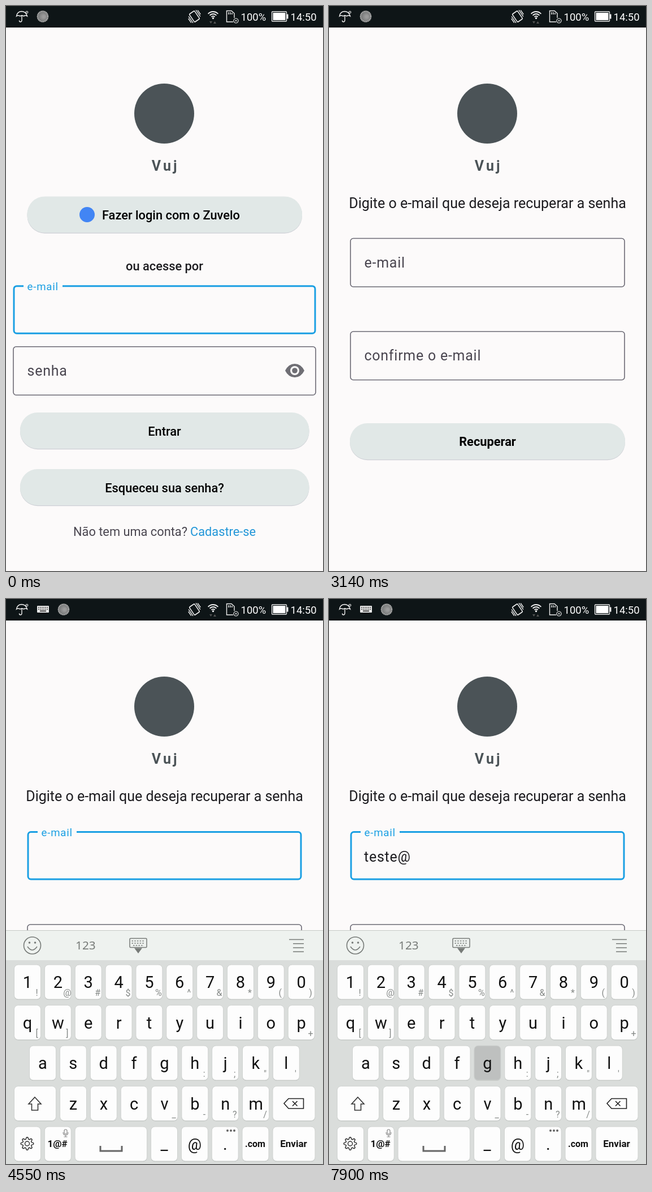
Recreate the animation shown at these times as an HTML page with a canvas. Size 561 px wide and 998 px high, loop 8000 ms.

```html
<!DOCTYPE html>
<html lang="pt">
<head>
<meta charset="utf-8">
<style>
html, body { margin: 0; width: 100%; height: 100%; overflow: hidden; background: #fcfafa; }
canvas { display: block; }
</style>
</head>
<body>
<canvas id="stage" width="561" height="998"></canvas>
<script>
const ctx = document.getElementById('stage').getContext('2d');
const LOOP = 8000, BLUE = '#1a9fe3', INK = '#49454f', PAPER = '#fcfafa', BUTTON = '#e1e8e7';
const BODY = 24.93, SMALL = 18.7, LABEL = 21.8, SPACING = 0.78;

const clamp = v => Math.min(1, Math.max(0, v));
const progress = (t, start, end) => clamp((t - start) / (end - start));
const mix = (a, b, p) => a + (b - a) * p;

function setFont(size, weight = 400, family = 'Roboto', spacing = 0) {
  ctx.font = `${weight} ${size}px "${family}", sans-serif`;
  ctx.letterSpacing = spacing + 'px';
}
function text(s, x, y, size, color, { weight, align = 'left', spacing, family } = {}) {
  setFont(size, weight, family, spacing);
  ctx.textAlign = align;
  ctx.fillStyle = color;
  ctx.fillText(s, x, y);
}
function box(x, y, w, h, r, fill, stroke, width = 1) {
  ctx.beginPath();
  ctx.roundRect(x, y, w, h, r);
  paint(fill, stroke, width);
}
function circle(x, y, r, fill, stroke, width = 1) {
  ctx.beginPath();
  ctx.arc(x, y, r, 0, 7);
  paint(fill, stroke, width);
}
function paint(fill, stroke, width, path) {
  if (fill) { ctx.fillStyle = fill; path ? ctx.fill(path) : ctx.fill(); }
  if (stroke) { ctx.strokeStyle = stroke; ctx.lineWidth = width; path ? ctx.stroke(path) : ctx.stroke(); }
}
const shape = (d, fill, stroke, width = 1.5) => paint(fill, stroke, width, new Path2D(d));
function layer(draw) { ctx.save(); draw(); ctx.restore(); }

// Status bar
function umbrella() {
  shape('M18.5 18 Q20 9.5 28 9.5 Q35.500 10 37.500 18 Q34 15.500 31.500 18 Q28 15.500 25 18 Q21.500 15.500 18.500 18 Z M28 17 V25 Q28 28 25.500 28 Q23.500 28 23.500 25.500', null, '#eee', 1.4);
  circle(37, 11, 1.8, null, '#eee', 1.1);
}
function sphere(x) {
  const g = ctx.createRadialGradient(x + 2, 19, 2, x, 18.5, 11);
  g.addColorStop(0, '#9b9b9b');
  g.addColorStop(1, '#6b6d6d');
  circle(x, 18.5, 10.5, g);
  layer(() => {
    ctx.setLineDash([1.5, 1.5]);
    circle(x, 18.5, 9, null, '#c2c2c2', 1.6);
  });
}
function statusKeyboard(p) {
  layer(() => {
    ctx.globalAlpha = p;
    box(55, 12, 21, 12, 1, '#e8e8e8');
    for (let r = 0; r < 2; r++)
      for (let i = 0; i < 6; i++) box(57 + i * 3.1, 14 + r * 3.2, 1.5, 1.5, 0, '#111');
    box(60, 20.5, 11, 1.5, 0, '#111');
  });
}
function statusBar(t) {
  const shift = 1 - (1 - progress(t, 3990, 4290)) ** 2;
  box(0, 0, 561, 38, 0, '#0e1517');
  umbrella();
  if (shift) statusKeyboard(shift);
  sphere(65 + 37 * shift);
  layer(() => {
    ctx.translate(333.5, 18.5);
    ctx.rotate(-0.6);
    box(-5.5, -8.5, 11, 17, 1.5, null, '#eee', 1.6);
    shape('M-8.500 -6 V8 M8.500 -8 V6 M-11 -3 V6 M11 -6 V3', null, '#eee', 1.4);
  });
  for (const r of [4, 8, 12]) {
    ctx.beginPath();
    ctx.arc(366.5, 22, r, -2.4, -0.74);
    paint(null, '#eee', 1.9);
  }
  circle(366.5, 21.5, 1.7, '#eee');
  shape('M360 27 h5 l-2.500 4 Z M367 31 h5 l-2.500 -4 Z', '#555');
  shape('M404 21 V13 L399 8.500 H390.500 V28 H402 M394 11 V15 M397 11 V15 M400 12 V15', null, '#eee', 1.4);
  circle(407, 26, 4, '#0e1517', '#eee', 1.2);
  shape('M405.500 24.500 l3 3 m0 -3 l-3 3', null, '#eee', 1);
  text('100%', 415.5, 26, 18.5, '#fff');
  box(470.5, 10, 26, 17, 1, null, '#eee', 1.3);
  box(472.5, 12, 22, 13, 0, '#fff');
  box(497, 14.5, 2.5, 8, 0, '#eee');
  text('14:50', 503.5, 26, 18.5, '#fff');
}

// Form parts
function brand() {
  circle(280, 190, 53, '#4b5357');
  text('Vuj', 257.7, 291, 25, '#4b5357', { weight: 700, spacing: 4.2 });
}
function button(label, x, y, w, baseline, { weight = 500, textX = 280.5, align = 'center', ripple } = {}) {
  box(x, y + 1.2, w, 64, 31, '#cdcfd5');
  box(x, y, w, 64, 31, BUTTON);
  if (ripple) layer(() => {
    ctx.beginPath();
    ctx.roundRect(x, y, w, 64, 31);
    ctx.clip();
    circle(304, 851, ripple, '#cfe4ea');
  });
  text(label, textX, baseline, LABEL, '#000', { weight, align });
}
function field(x, y, w, label, focus, value = '', cursor = false, composing = false) {
  const tx = x + 24.5;
  if (focus) {
    box(x + 1, y + 1, w - 2, 83.5, 5, null, BLUE, 3);
    const gap = 69 * focus;
    box(x + 52.5 - gap / 2, y - 1, gap, 4, 0, PAPER);
  } else {
    box(x, y, w, 85.5, 5, null, '#6b6974', 1.6);
  }
  text(label, tx, mix(y + 51, y + 8, focus), mix(BODY, SMALL, focus), focus ? BLUE : INK, { spacing: SPACING });
  setFont(BODY, 400, 'Roboto', SPACING);
  const width = ctx.measureText(value).width;
  if (value) text(value, tx - 0.5, y + 53, BODY, '#1c1b1f', { spacing: SPACING });
  if (value && composing) box(tx - 0.5, y + 55.5, width, 1.6, 0, '#1c1b1f');
  if (cursor) box(tx + width - (value ? 0.5 : 0), y + 26.5, 2.8, 33, 0, BLUE);
}

function loginScreen(t) {
  brand();
  button('Fazer login com o Zuvelo', 37.5, 336.5, 486.5, 376.7, { textX: 170, align: 'left' });
  circle(143.5, 368.5, 13.5, '#4285f4');
  text('ou acesse por', 280.5, 466.5, LABEL, '#1c1b1f', { weight: 500, align: 'center' });
  const cursor = t >= 230 && t < 730 || t >= 1230 && t < 1790;
  field(13, 493.7, 535, 'e-mail', 1, '', cursor);
  field(13, 601.7, 535, 'senha', 0);
  shape('M494 644 Q500 632 511 632 Q522 632 528 644 Q522 656 511 656 Q500 656 494 644 Z', '#6f6e74');
  circle(511, 644, 8, PAPER);
  circle(511, 644, 4.8, '#6f6e74');
  button('Entrar', 25, 718, 511.5, 758.8);
  const ripple = t < 1790 ? 0 : mix(32, 78, progress(t, 1790, 1890));
  button('Esqueceu sua senha?', 25, 818, 511.5, 858.8, { ripple });
  text('Não tem uma conta?', 119, 936, LABEL, INK);
  text('Cadastre-se', 326, 936, LABEL, '#2196d8');
}

// Typing
const FOCUS = 3650;
const taps = [['t', 5100], ['e', 5380], ['s', 5640], ['t', 5870], ['e', 6080], ['@', 7030], ['g', 8010]];
const suggestions = {
  t: ['t', 'tem', 'também', 'todos', 'tudo'],
  te: ['te', 'teste', 'tenho', 'Tevolinda', 'terra'],
  tes: ['tes', 'teste', 'testes', 'tese', 'tesoura'],
  test: ['test', 'teste', 'testes', 'testar', 'testa'],
  teste: ['teste', 'testes', 'testemunhas', 'testemunho'],
};
function typingState(t) {
  const done = taps.filter(([, at]) => t >= at);
  const value = done.map(([c]) => c).join('');
  const since = t - (done.length ? done[done.length - 1][1] : FOCUS);
  return { value, cursor: since >= 0 && Math.floor(since / 500) % 2 === 0 };
}

function recoverScreen(t) {
  brand();
  text('Digite o e-mail que deseja recuperar a senha', 280.5, 357, 25, '#1c1b1f', { align: 'center' });
  const { value, cursor } = typingState(t);
  const focus = 1 - (1 - progress(t, FOCUS, 3890)) ** 2;
  field(38, 410.5, 485, 'e-mail', focus, value, cursor, !value.includes('@'));
  field(38, 575, 485, 'confirme o e-mail', 0);
  button('Recuperar', 37, 737, 487, 776.8, { weight: 700 });
}

// Keyboard
const rowTop = r => 646 + r * 71.5;
const keys = [];
[
  ['1234567890', 14.5, '!@#$%^&*()'],
  ['qwertyuiop', 14.5, '[]       +'],
  ['asdfghjkl', 41.5, '     :;"\''],
  ['zxcvbnm', 95.5, '   _-?/'],
  ['_@.', 256.5, ''],
].forEach(([chars, left, subs], row) => [...chars].forEach((char, i) =>
  keys.push({ char, sub: subs[i] || '', x: left + i * 53.85, y: rowTop(row), w: 47 })));
const wideKeys = [[14.5, 3, 74], [472, 3, 75], [14.5, 4, 47], [68.3, 4, 47], [122, 4, 127.5], [418, 4, 47], [472, 4, 75]];

function keyCap(x, y, w, pressed) {
  box(x, y + 1, w, 61, 7, '#bfc3c0');
  box(x, y, w, 61, 7, pressed ? '#bec0bf' : '#fdfdfd', '#cfd2d0', 1);
}
function specialKeys() {
  for (const [x, row, w] of wideKeys) keyCap(x, rowTop(row), w);
  shape('M51 880 L62 892 H56.500 V903 H45.500 V892 H40 Z', null, '#333', 1.6);
  shape('M492 891 L500 882.500 H526.500 V900 H500 Z M507 887 l8.500 8.500 m0 -8.500 l-8.500 8.500', null, '#222', 1.6);
  ctx.beginPath();
  for (let i = 0; i <= 64; i++) {
    const a = i / 64 * Math.PI * 2, r = 9.6 + 1.6 * Math.tanh(3 * Math.cos(8 * a));
    ctx.lineTo(37.5 + r * Math.cos(a), 962 + r * Math.sin(a));
  }
  paint(null, '#333', 1.5);
  circle(37.5, 962, 4, null, '#333', 1.5);
  text('1@#', 91, 968, 17, '#111', { weight: 700, align: 'center' });
  box(103, 937, 5, 8, 2.5, null, '#888', 1.2);
  shape('M101 942 q0 5 4.500 5 q4.500 0 4.500 -5 M105.500 947 v3 M102.500 950 h6', null, '#888', 1.1);
  shape('M167 966 V975 H205 V966', null, '#666', 3);
  for (let i = 0; i < 3; i++) circle(392 + i * 6, 939, 2, '#666');
  text('.com', 441, 968, 16, '#111', { weight: 700, align: 'center' });
  text('Enviar', 509, 968, 17, '#111', { weight: 700, align: 'center' });
}
function toolbar() {
  const c = '#777b78';
  circle(46.5, 612, 15, null, c, 1.6);
  circle(41.5, 607, 1.8, c);
  circle(51.5, 607, 1.8, c);
  shape('M38 614 Q46.500 626 55 614', null, c, 1.6);
  text('123', 123, 619, 20.8, c, { family: 'Noto Sans' });
  box(219, 599.5, 30, 16, 1.5, null, c, 1.5);
  layer(() => {
    ctx.setLineDash([2.5, 2.2]);
    shape('M222.500 604 H246 M222.500 608 H246 M225 612 H244', null, c, 1.6);
  });
  shape('M227 616.500 H241 L234 626 Z', c);
  shape('M501 601.500 H527 M508 608.700 H527 M508 616 H527 M508 623 H527', null, c, 1.6);
}
function suggestionBar(words) {
  layer(() => {
    ctx.beginPath();
    ctx.rect(0, 586, 491, 52);
    ctx.clip();
    let x = 0;
    words.forEach((word, i) => {
      const weight = i ? 400 : 700;
      setFont(31, weight);
      const w = Math.max(75, ctx.measureText(word).width + 27);
      if (!i) box(x, 586, w, 52, 0, '#9fa2a0');
      text(word, x + w / 2 - 1, 623, 31, i ? '#444846' : '#fff', { weight, align: 'center' });
      x += w;
      box(x, 586, 1, 52, 0, '#c3c7c4');
    });
    const fade = ctx.createLinearGradient(470, 0, 491, 0);
    fade.addColorStop(0, '#eef2ef00');
    fade.addColorStop(1, '#eef2ef');
    box(470, 586, 21, 52, 0, fade);
  });
  circle(526, 611, 17, null, '#6f7370', 1.5);
  shape('M520.500 608.500 h11 l-5.500 6.500 Z', '#6f7370');
}
function popup(key) {
  const x = key.x + key.w / 2 - 46, y = key.y - 109.5;
  layer(() => {
    ctx.shadowColor = '#0004';
    ctx.shadowBlur = 4;
    ctx.shadowOffsetY = 1;
    box(x, y, 92, 106, 1, '#fbfbfb');
  });
  box(x, y, 92, 106, 1, null, '#b8baba', 1);
  text(key.char, x + 46, y + 73, 58, '#000', { align: 'center' });
}
function keyboard(t) {
  const { value } = typingState(t);
  box(0, 585, 561, 413, 0, '#dadddb');
  box(0, 585, 561, 53, 0, '#eef2ef');
  box(0, 585, 561, 1, 0, '#c6cac7');
  suggestions[value] ? suggestionBar(suggestions[value]) : toolbar();
  const pressed = taps.find(([, at]) => t >= at - 130 && t < at);
  const shown = taps.find(([, at]) => t >= at && t < at + 150);
  for (const key of keys) {
    keyCap(key.x, key.y, key.w, pressed && pressed[0] === key.char);
    text(key.char, key.x + 23.5, key.y + 41, key.char === '@' ? 27 : 29, '#111', { align: 'center' });
    text(key.sub, key.x + 40, key.y + 55, 16, '#858987', { align: 'center' });
  }
  specialKeys();
  if (shown) popup(keys.find(k => k.char === shown[0]));
}

function draw(t) {
  box(0, 0, 561, 998, 0, PAPER);
  const opened = progress(t, 2300, 2440);
  if (opened < 1) loginScreen(t);
  if (opened > 0) layer(() => {
    ctx.globalAlpha = opened;
    ctx.translate(0, 40 * (1 - opened) ** 2);
    box(0, 0, 561, 998, 0, PAPER);
    recoverScreen(t);
  });
  const rest = 1 - progress(t, 3560, 3890);
  if (rest < 1) layer(() => {
    ctx.globalAlpha = 1 - rest ** 1.4;
    ctx.translate(0, 82 * rest ** 2);
    keyboard(t);
  });
  statusBar(t);
}

function tick() {
  draw(performance.now() % LOOP);
  requestAnimationFrame(tick);
}
tick();
</script>
</body>
</html>
```
